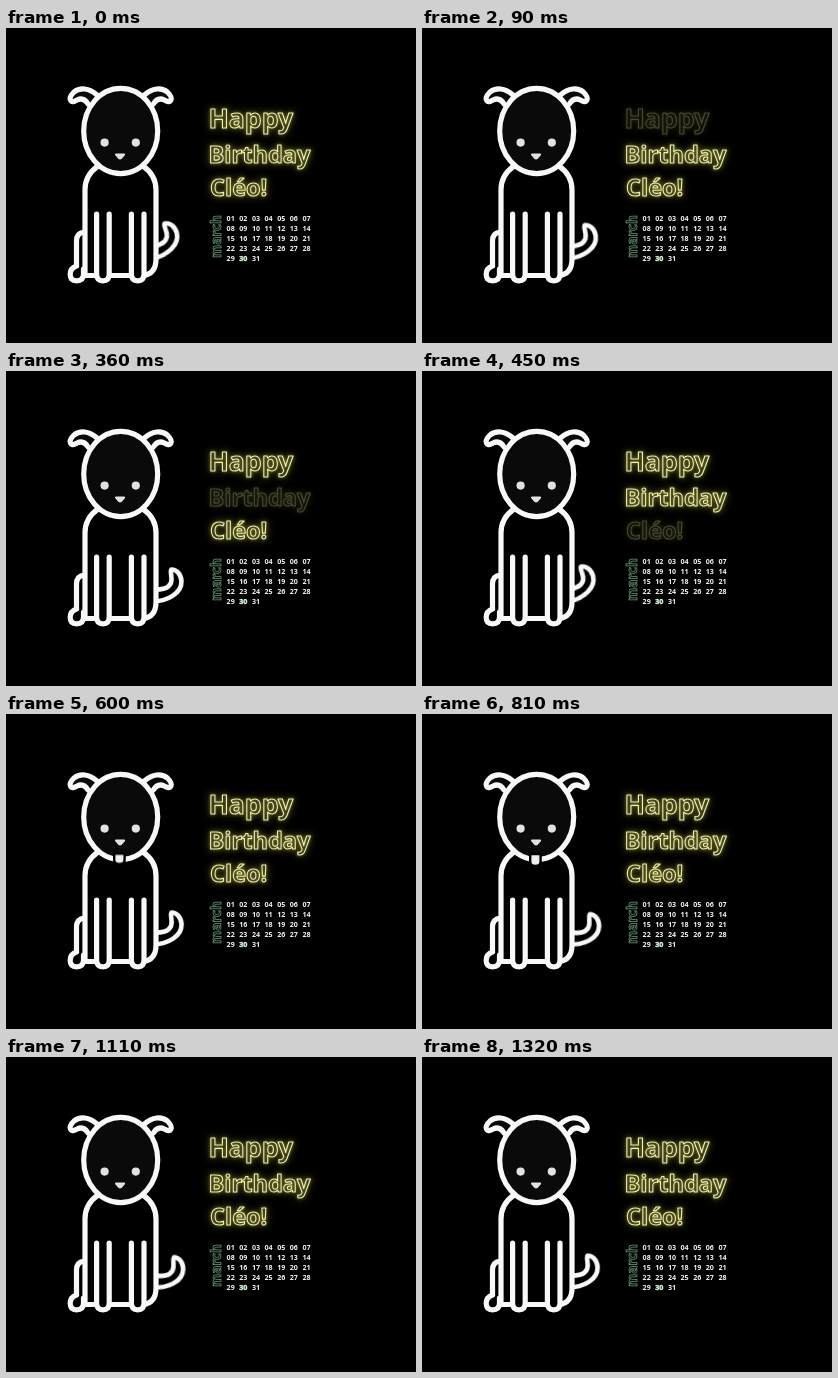
Recreate the animation shown at these times as an HTML page. Size 410x315 px, loop 1350 ms.

```html
<!DOCTYPE html>
<html lang="en">
<head>
<meta charset="utf-8">
<title>Birthday card</title>
<style>
  html, body { margin: 0; height: 100%; overflow: hidden; background: #000; }
  svg { display: block; width: 410px; height: 315px; }

  .dog { fill: #000; stroke: #f8f8fa; stroke-width: 5.2; stroke-linecap: round; stroke-linejoin: round; }
  .dog .skin { fill: #0a0a0a; }
  .dog .face { fill: #e2e2e4; stroke: none; }
  .dog .tongue { fill: #f0f0f2; stroke: #000; stroke-width: 2.4; }

  .tail { stroke-width: 4.6; transform-origin: 148px 230px; animation: wag 1350ms infinite; }
  .tongue { transform-origin: 114px 140px; animation: lick 1350ms infinite; }

  .neon text {
    font-family: "Open Sans", "Noto Sans", sans-serif; font-weight: 700;
    fill: none; stroke: #f2f2b4; stroke-width: 1.1; stroke-linejoin: round;
    filter: drop-shadow(0 0 1.5px #85853a) drop-shadow(0 0 3.5px #66661f);
    animation: 1350ms step-end infinite;
  }
  .neon .a { animation-name: blink-a; }
  .neon .b { animation-name: blink-b; }
  .neon .c { animation-name: blink-c; }

  .cal { font: 700 7.1px "Open Sans", "Noto Sans", sans-serif; fill: #f4f4f4; }
  .cal .party { fill: #e6f2e8; stroke: #6f9f78; stroke-width: .7; paint-order: stroke; }
  .month {
    font: 700 13.4px "Open Sans", "Noto Sans", sans-serif;
    fill: #020602; stroke: #6f9f78; stroke-width: .75;
  }

  /* A 480 ms swing, cut off where the loop restarts. */
  @keyframes wag {
    0%, 35.56%, 71.11% { transform: rotate(-12deg); animation-timing-function: ease-in-out; }
    17.78%, 53.33% { transform: rotate(12deg); animation-timing-function: ease-in-out; }
    88.89% { transform: rotate(12deg); animation-timing-function: ease-in; }
    100% { transform: rotate(-4.6deg); }
  }
  @keyframes lick {
    0%, 33.3% { transform: scaleY(0); animation-timing-function: ease-out; }
    51%, 62% { transform: none; animation-timing-function: ease-in; }
    79%, 100% { transform: scaleY(0); }
  }
  @keyframes blink-a { 0%, 8.89% { opacity: 1; } 4.44% { opacity: .3; } }
  @keyframes blink-b { 0%, 28.89% { opacity: 1; } 22.22% { opacity: .3; } }
  @keyframes blink-c { 0%, 37.78% { opacity: 1; } 33.33% { opacity: .3; } }
</style>
</head>
<body>
<svg viewBox="0 0 410 315">
  <defs>
    <path id="ear" d="M91 67C83 60 74 59 68 64C65 67 63.5 70 64.5 72C66 75 69 73 71 72C75 70 79 71 82 76"/>
    <path id="leg" d="M90.6 186V246Q90.6 252.8 97 252.8Q103.2 252.8 103.2 246V186"/>
  </defs>

  <g class="dog">
    <path class="tail" d="M144 230.5C162 231 176 222 175.5 210C175 203 170.5 198.5 165.5 198.5C163.5 201 167 206 165 212C162.5 217.5 157 219 144 218.5"/>
    <path d="M78 204Q70.5 205 70.5 213V238"/>
    <path d="M92 138Q79 147 79 162V247.5H137Q150 246 150 231V162Q150 147 137 138"/>
    <path d="M70.5 238Q64.2 240 64.2 246.5Q64.2 252.8 70.5 252.8Q77.5 252.8 77.5 246V241"/>
    <use href="#leg"/>
    <use href="#leg" x="34.8"/>
    <use href="#ear" class="skin"/>
    <use href="#ear" class="skin" transform="matrix(-1 0 0 1 229.4 0)"/>
    <ellipse class="skin" cx="114.7" cy="103" rx="37" ry="42.6"/>
    <path class="tongue" d="M108.2 140H118.6V147.5Q118.6 152 113.4 152Q108.2 152 108.2 147.5Z"/>
    <g class="face">
      <circle cx="98.6" cy="114.6" r="4.1"/>
      <circle cx="129.8" cy="114.6" r="4.1"/>
      <path d="M110 125.4H118Q120 125.6 118.6 127.6L115.8 130.8Q114 132.4 112.3 130.8L109.5 127.6Q108.2 125.6 110 125.4Z"/>
    </g>
  </g>

  <g class="neon">
    <text class="a" x="202.4" y="100.3" font-size="26.6">Happy</text>
    <text class="b" x="202.4" y="134.8" font-size="23.6">Birthday</text>
    <text class="c" x="204" y="167.6" font-size="23.5">Cléo!</text>
  </g>

  <text class="month" transform="translate(215 230) rotate(-90)">march</text>
  <g class="cal"></g>
</svg>
<script>
  const cal = document.querySelector(".cal");
  for (let i = 0; i < 31; i++) {
    const day = document.createElementNS(cal.namespaceURI, "text");
    day.setAttribute("x", 220.6 + (i % 7) * 12.64);
    day.setAttribute("y", 192.6 + Math.floor(i / 7) * 10);
    day.textContent = String(i + 1).padStart(2, "0");
    if (i === 29) day.setAttribute("class", "party");
    cal.append(day);
  }
</script>
</body>
</html>
```
